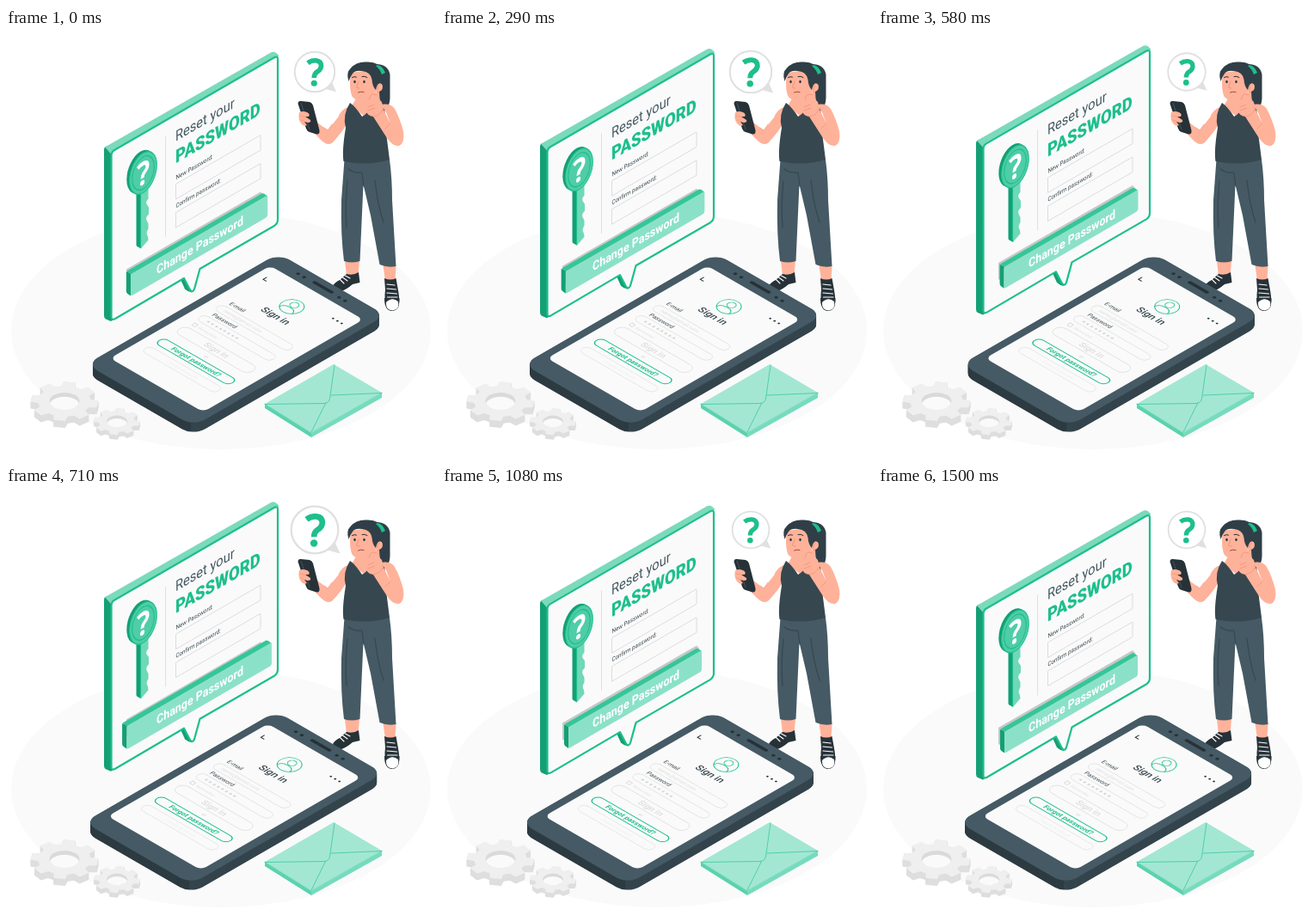
Write an HTML page with a canvas that moves like this. It is 500x500 px and loops after 1540 ms.

```html
<!DOCTYPE html>
<html lang="en">
<head>
<meta charset="utf-8">
<title>Reset your password</title>
<style>
  html, body { margin: 0; width: 100%; height: 100%; overflow: hidden; background: #fff; }
  canvas { display: block; width: 500px; height: 500px; }
</style>
</head>
<body>
<canvas id="stage"></canvas>
<script>
const canvas = document.getElementById('stage');
const ctx = canvas.getContext('2d');
const ratio = window.devicePixelRatio || 1;
canvas.width = canvas.height = 500 * ratio;

const LOOP = 1540, STEPS = 37;
const GREEN = '#1dbf8c', DEEP = '#149f74', MINT = '#8be1c7', PALE = '#a3e7d2';
const INK = '#263238', HAIR = '#303f47', SLATE = '#37474f', STEEL = '#455a64';
const SKIN = '#ffb29a', BLUSH = '#ee8f74', PAPER = '#fafafa', GREY = '#e0e0e0';
const COS = Math.cos(Math.PI / 6), SLOPE = Math.tan(Math.PI / 6);

// Keyframes: [progress, value], linear between them.
const FLOAT = [[0, 0], [.5, -10], [1, 0]];
const BEAT = [[0, 0], [.1, 1], [.3, 0], [.4, 0], [.5, 1], [.6, 0], [1, 0]];
const SHAKE = [[0, 0], [.1, -1], [.2, 2], [.3, -4], [.4, 4], [.5, -4],
               [.6, 4], [.7, -4], [.8, 2], [.9, -1], [1, 0]];

function track(keys, p) {
  const i = Math.max(1, keys.findIndex(k => k[0] >= p));
  const [p0, v0] = keys[i - 1], [p1, v1] = keys[i];
  return v0 + (v1 - v0) * (p - p0) / (p1 - p0);
}

function fill(d, color) {
  ctx.fillStyle = color;
  ctx.fill(d instanceof Path2D ? d : new Path2D(d));
}

function line(d, color, width = 1) {
  ctx.strokeStyle = color;
  ctx.lineWidth = width;
  ctx.stroke(d instanceof Path2D ? d : new Path2D(d));
}

function oval(x, y, rx, ry = rx) {
  const path = new Path2D();
  path.ellipse(x, y, rx, ry, 0, 0, Math.PI * 2);
  return path;
}

function box(x, y, w, h, r) {
  const path = new Path2D();
  path.roundRect(x, y, w, h, r);
  return path;
}

function group(draw, ...matrix) {
  ctx.save();
  if (matrix.length) ctx.transform(...matrix);
  draw();
  ctx.restore();
}

const shift = (x, y, draw) => group(draw, 1, 0, 0, 1, x, y);
const zoom = (s, x, y, draw) => group(draw, s, 0, 0, s, x - s * x, y - s * y);
const onWall = (x, y, draw) => group(draw, COS, -.5, 0, 1, x, y);

function text(str, x, y, size, color, weight = 400, align = 'left') {
  ctx.font = `${weight} ${size}px Roboto, sans-serif`;
  ctx.textAlign = align;
  ctx.fillStyle = color;
  ctx.fillText(str, x, y);
}

function questionMark(color) {
  group(() => {
    ctx.lineCap = 'butt';
    line('M-8 -9.5Q-4 -12.4 .5 -12.2Q6.6 -11.6 6.4 -6Q6 -2.4 2 0Q-1.2 2 -1.2 6.5', color, 5.2);
  });
  fill(oval(-1.2, 12.2, 3.3), color);
}

function gear(x, y, rx, depth, teeth, turn) {
  const ry = rx * .58, outline = new Path2D();
  const step = Math.PI * 2 / teeth;
  for (let i = 0; i < teeth; i++) {
    [[-.34, .78], [-.22, 1], [.22, 1], [.34, .78]].forEach(([da, r]) => {
      const a = turn + (i + da) * step;
      outline.lineTo(x + rx * r * Math.cos(a), y + ry * r * Math.sin(a));
    });
  }
  outline.closePath();
  for (let d = depth; d > 0; d -= .5) shift(0, d, () => fill(outline, '#dedede'));
  fill(outline, '#efefef');
  const hole = oval(x, y, rx * .44, ry * .44);
  fill(hole, '#dadada');
  group(() => {
    ctx.clip(hole);
    fill(oval(x, y + depth * .6, rx * .44, ry * .44), PAPER);
  });
}

function envelope() {
  fill('M301 437L355 470V476L301 442Z', '#5ad2ad');
  fill('M355 470L437 424V430L355 476Z', '#76dbbd');
  fill('M301 437L381 391L437 424L355 471Z', PALE);
  line('M301 437L355 470.5L437 424', '#7fdcc0', .8);
  line('M301 437.5L370 436.5Q375.5 436 376.5 431L382 392M437 424.5L378 427M355 470L371.5 436.5', '#3cc89d', .8);
}

function key() {
  fill('M151.5 188L157 190V256L152.5 253.5Q151.5 253 151.5 251Z', DEEP);
  fill('M156 190L165.5 186V198Q161.5 202 164 205L166 208V216Q161.5 220 164 224L165.5 227V233Q162 238 165 242L165.5 246L157 256Z', '#6fd8b7');
  line('M156.5 192V255', GREEN, 1.2);
  const disc = (dx, color) =>
    onWall(159.5 + dx, 168 + dx * .5, () => fill(oval(0, 0, 18.7, 23.5), color));
  [-3, -2, -1].forEach(dx => disc(dx, DEEP));
  disc(0, '#4fcda6');
  onWall(159.5, 168, () => {
    line(oval(0, 0, 18.2, 23), GREEN, 1);
    line(oval(0, 0, 14.8, 18.6), GREEN, 1.2);
    zoom(.9, 0, 0, () => questionMark('#fff'));
  });
}

function changeButton(beat) {
  fill('M140 280L296 190L299 193V200L146 287V303L140 299Z', '#c7c7c7');
  zoom(1 + .1 * beat, 222, 251, () => {
    fill('M142 282L147 284V309.5L143.5 307Q142 306 142 304Z', DEEP);
    fill('M142.5 281.5L295.5 193.5Q297 193 298.5 194L302 196.5L147 285Z', '#35c698');
    fill('M147 287Q147 285 149 284L300 196.5Q302 195.5 302 198V217.5Q302 220 300 221L149.5 308.5Q147 310 147 307.5Z', MINT);
  });
  onWall(175, 286, () => text('Change Password', 0, 0, 14.4, '#fff', 700));
}

function panel(beat) {
  fill('M114 141Q114 138 117 137L126 142V338L122 340.5L116 338Q114 337 114 334Z', DEEP);
  fill('M115 138L308 28Q311 26.5 313.5 28L317 31L316 36L123 147Z', '#7bdabb');
  fill('M203 292L208 303Q211 306 216 307L217 290Z', DEEP);
  const face = 'M122.5 148Q122.5 143.5 126 141.5L312 33.8Q316 31.8 316 36V222Q316 227 312 229.5'
    + 'L225.5 279.5L219 303Q217 308 214 304L207 290.5L127 337.5Q122.5 340 122.5 335.5Z';
  fill(face, PAPER);
  line(face, GREEN, 2.2);
  line('M185.5 126V242', GREY);

  onWall(197, 131.5, () => text('Reset your', 0, 0, 16.9, STEEL));
  onWall(197, 157, () => text('PASSWORD', 0, 0, 21.3, GREEN, 900));
  onWall(197.5, 176, () => text('New Password:', 0, 0, 7.2, SLATE));
  onWall(197.5, 209, () => text('Confirm password:', 0, 0, 7.2, SLATE));
  [181, 214].forEach(y => group(() => line(box(0, 0, 98.5, 17.5, .8), '#dcdcdc'),
    1, -SLOPE, 0, 1, 197.5, y));
  key();
  changeButton(beat);
}

function phone() {
  const onFloor = (drop, draw) => group(draw, COS, .5, -COS, .5, 317, 262 + drop);
  const body = box(0, 0, 144, 258, 15);
  const side = (x, w, color) => group(() => {
    ctx.beginPath();
    ctx.rect(x, 0, w, 500);
    ctx.clip();
    for (let d = 11; d > 0; d -= .5) onFloor(d, () => fill(body, color));
  });
  side(0, 216, '#2d3b42');
  side(216, 284, '#34444c');
  onFloor(0, () => {
    fill(body, STEEL);
    fill(box(9, 20, 125, 215, 7), PAPER);
    line('M58 9.5H81', INK, 4);
    [37, 45, 92, 100].forEach(x => fill(oval(x, 10.5, 1.9), INK));

    line('M20 36V40.5H24', INK, 1.3);
    [112.5, 118.3, 124].forEach(x => fill(oval(x, 39, 1.2), INK));
    line(oval(71, 53, 11.8), GREEN, .9);
    line(oval(71, 49.5, 4.4), GREEN, .9);
    line('M62.5 61Q63 55 71 55Q79 55 79.5 61', GREEN, .9);
    text('Sign in', 71, 78.5, 11.5, SLATE, 500, 'center');

    const pill = (y, h, color, w = .8) => line(box(21.3, y, 98.5, h, h / 2), color, w);
    text('E-mail', 25.5, 92.5, 7, SLATE);
    pill(97, 11.5, '#e2e2e2');
    text('name@email.com', 30, 104.8, 6.2, '#dedede');
    text('Password', 27, 117, 7, SLATE);
    pill(120.5, 11.5, '#e2e2e2');
    text('* * * * * * * *', 31, 130.5, 8, '#c4c4c4');
    line(box(25, 137, 4.5, 4.5, .5), '#d6d6d6', .8);
    text('Remember', 33, 141.5, 5, GREY);
    pill(146.5, 15, '#e0e0e0');
    text('Sign in', 71, 157.5, 10, GREY, 700, 'center');
    text('or', 72, 170.5, 5.5, '#d4d4d4', 400, 'center');
    pill(175.2, 12, GREEN, 1.2);
    text('Forgot password?', 71, 184, 8, GREEN, 700, 'center');
    pill(194, 11.5, '#e6e6e6');
    text('Create account', 71, 201.8, 6, '#eeeeee', 400, 'center');
  });
}

function bubble(scale) {
  zoom(scale, 359, 51, () => {
    fill('M369 69L382 72.5L377 61Z', GREY);
    fill(oval(359, 51, 21.4), '#fff');
    line(oval(359, 51, 21.4), GREY, 1.8);
    shift(359.5, 51, () => questionMark(GREEN));
  });
}

function shoes() {
  fill('M394 271H411L409.5 288H396Z', SKIN);
  fill('M438.5 276H453.5L452.5 294H441Z', SKIN);
  fill('M380 300Q381 307 389 307Q396 304 403 299.5L411.5 297.5V294L395 296Z', '#fff');
  fill('M396 286Q404 288 410 284L411.5 296L403 298Q396 304 390 306Q382 306 380 300Q382 296 388 293Z', INK);
  line('M388 292L393 297M391.5 290L397 294M394.5 288L400 291', '#fff', 1.1);
  fill('M440 314Q440 329 449 329Q457.5 329 457.5 314Z', INK);
  fill('M440 291Q447 294 453.5 291L456 305Q458.5 318 456 325Q449 331 442.5 325Q439.5 316 441 304Z', INK);
  fill('M442 319Q449 312 456 318Q458 327 450 328.5Q441 328 442 319Z', '#fff');
  line('M443 298L452 299M443 303L453.5 304M443 308L454.5 309M443.5 313L455 313', '#fff', 1.2);
}

function woman() {
  fill('M428 42Q444 41 446.5 54L446.5 82Q446 91 441 96Q436 88 432 78Z', HAIR);
  shoes();
  fill('M393.5 153H446Q449 175 449 200L453.5 277Q444 279 434.5 275L424 218L415.5 182L414 215L411.5 271Q402 274 393 271Q389 240 390 200Z', STEEL);
  line('M398 164Q404 169 414 168L416 184M429 177Q432 205 439 226M397 178Q394 205 396 232', SLATE, 1.2);

  // Arm with the handset
  fill('M398 92Q390 94 386 104L374 119L357 106Q351 99 345 100L343 107Q354 116 364 128Q374 139 380 133Q391 121 396 112Z', SKIN);
  line('M379 112Q376 117 374 119L370 116', BLUSH, .7);
  fill('M339.5 88Q339.5 84.5 343 85L353 86Q356 87 357 90L364.5 119Q365 124 361 123.5L353 121Q350 120 349 117Z', INK);
  line('M343 87L353 118', '#52646d', .7);
  fill('M341 98Q345 96 350 98Q354 100 352 103L348 103L354 107Q355 110 351 110L347 109L350 113Q346 115 343 111Q339 105 341 98Z', SKIN);
  line('M342 102L348 103M343 107L348 109', BLUSH, .6);

  fill('M409 78L434 74L435 89L421 106L402 91Z', SKIN);
  fill('M400 87Q406 91 414 103Q420 100 427 89L439 90Q442 102 441 114L446 153Q420 161 392.5 155Q390.5 143 395 116Q391 101 400 87Z', SLATE);

  // Thinking arm
  fill('M436 89Q447 87 452 94Q458 105 462 120Q464 134 457 137Q450 138 443 128L427 103Q417 101 420 93L417 88Q418 84 423 83L427 77Q430 76 431 80L437 86L439 95L447 111L442 98Z', SKIN);
  line('M427 103Q435 102 438 95M447 111L441 117M421 92L428 89M421 96L429 93', BLUSH, .7);

  // Head
  fill('M401 52Q399 66 401 75Q402 83 411 84.5Q424 85 430 74Q438 75 438 68Q437 62 431 65L429 48Z', SKIN);
  fill('M398.5 62Q395 52 401 46.5Q408 38.5 420 39.5Q434 39 439 50Q442 62 437 65Q432 62 430 72Q426 68 425.5 60Q424 51 414 50Q406 49 403 53Q400 57 398.5 62Z', HAIR);
  fill('M432 43Q438 44 441 52L437 54Q435 48 430 44Z', GREEN);
  line('M402.5 57.5Q405 56 407.5 57M414 56.5Q417 55.5 420 57.5', INK, 1);
  fill(oval(405.5, 62.5, 1.2, 1.7), INK);
  fill(oval(416.5, 62.5, 1.2, 1.7), INK);
  line('M410 62L407.5 69Q409 70.5 411 70', BLUSH, .9);
  line('M409.5 75Q412 73.5 416 74.5', '#8d3f32', .9);
  line('M434 66.5Q431 68 432 72', BLUSH, .8);
  fill('M422 84L423 78Q426 75 429 79L430 84Z', SKIN);
  line('M422 83Q423 78 426 77L431 78', BLUSH, .7);
}

function draw(now) {
  const step = Math.min(STEPS - 1, Math.floor((now % LOOP) * STEPS / LOOP + .1));
  const p = (step + 1) / STEPS, beat = track(BEAT, p);
  ctx.setTransform(ratio, 0, 0, ratio, 0, 0);
  ctx.lineCap = ctx.lineJoin = 'round';
  ctx.fillStyle = '#fff';
  ctx.fillRect(0, 0, 500, 500);

  fill(oval(250, 352, 244, 138), PAPER);
  gear(68, 434, 39.5, 8, 8, .15);
  gear(129, 457.5, 27, 5.5, 8, .15);
  envelope();
  woman();
  shift(track(SHAKE, p), 0, phone);
  shift(0, track(FLOAT, p) + 1, () => panel(beat));
  bubble(1 + .32 * beat);
  requestAnimationFrame(draw);
}
requestAnimationFrame(draw);
</script>
</body>
</html>
```
